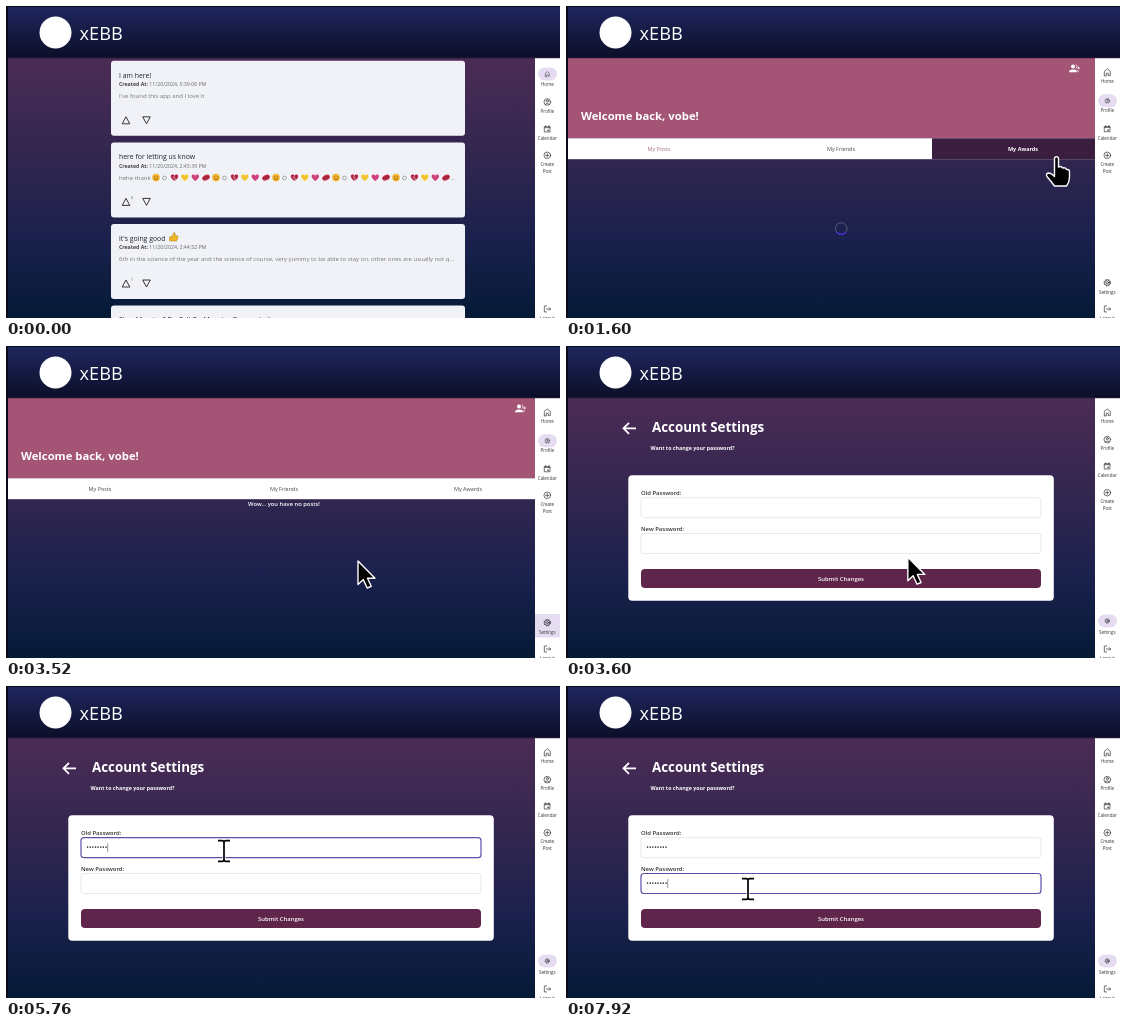
An HTML page for the animation above (8000 ms loop, 554 px wide and 312 px high).

```html
<!DOCTYPE html>
<html lang="en">
<head>
<meta charset="utf-8">
<title>Account walkthrough</title>
<style>
  html, body { margin: 0; width: 100%; height: 100%; overflow: hidden; background: #0a0d24; }
  svg { display: block; width: 100vw; height: 100vh; font-family: "Open Sans", "Noto Sans", sans-serif; }
  .line { fill: none; stroke: #2b2930; stroke-width: 2; stroke-linecap: round; stroke-linejoin: round; }
  .pointer { fill: #000; stroke: #fff; stroke-width: 1.4; stroke-linejoin: round; }
</style>
</head>
<body>
<svg id="stage" viewBox="0 0 554 312"></svg>
<script>
const stage = document.getElementById('stage');

const text = (x, y, size, fill, content, weight = 400, anchor = 'start') =>
  `<text x="${x}" y="${y}" font-size="${size}" fill="${fill}" font-weight="${weight}" text-anchor="${anchor}">${content}</text>`;
const rect = (x, y, w, h, fill, rx = 0, extra = '') =>
  `<rect x="${x}" y="${y}" width="${w}" height="${h}" fill="${fill}" rx="${rx}" ${extra}/>`;
const gradient = (id, ...stops) =>
  `<linearGradient id="${id}" x2="0" y2="1">${stops.map(([at, color]) =>
    `<stop offset="${at}" stop-color="${color}"/>`).join('')}</linearGradient>`;

// Icons are drawn on a 24-unit grid centred on the origin.
const icons = {
  Home: '<path d="M-9 10V-3L0-10 9-3V10H3V3H-3V10Z"/>',
  Profile: '<circle r="10"/><circle cy="-3" r="3.4"/><path d="M-6.5 7Q0 0 6.5 7"/>',
  Calendar: '<path d="M-8-7H8V9H-8ZM-8-4H8M-5-10V-7M5-10V-7"/><path d="M2 3H4V5H2Z"/>',
  Create: '<circle r="10"/><path d="M-5 0H5M0-5V5"/>',
  Settings: '<circle r="8"/><circle r="3.4"/><circle r="9.8" stroke-width="3" stroke-dasharray="3.8 3.9" stroke-linecap="butt"/>',
  Logout: '<path d="M-2-9H-9V9H-2M-3 0H10M6-4 10 0 6 4"/>'
};

function sidebar(active, ys, hover) {
  const item = ([name, y]) => {
    const on = name === active;
    const labelY = name === 'Settings' ? 287.5 : y + (on ? 11.5 : 10.7);
    return (on ? rect(532, y - 6.5, 19, 13, '#e6dcf2', 6.5) : '') +
      `<g class="line" transform="translate(541.3 ${y}) scale(${on ? .23 : .33})">${icons[name]}</g>` +
      text(541.3, labelY, 4.5, '#333', name, 400, 'middle') +
      (name === 'Create' ? text(541.3, labelY + 7, 4.5, '#333', 'Post', 400, 'middle') : '');
  };
  return rect(529, 52, 25, 260, '#fff') +
    (hover ? `<g class="hover">${rect(529, hover, 25, 23.5, '#e6dcf2')}</g>` : '') +
    Object.entries(ys).map(item).join('');
}

const heart = (x, y, fill) =>
  `<path transform="translate(${x} ${y})" fill="${fill}" d="M0 3.4C-2.5 1.5-3.7.2-3.7-1.3-3.7-3.3-1-3.9 0-1.8 1-3.9 3.7-3.3 3.7-1.3 3.7.2 2.5 1.5 0 3.4Z"/>`;

function emojiRow(y) {
  let row = '';
  for (let x = 150; x < 400; x += 60) {
    row += `<circle cx="${x}" cy="${y}" r="3.8" fill="#f3b52f"/>
      <path d="M${x - 2} ${y + .7}q2 2.4 4 0M${x - 2} ${y - 1}h1.2M${x + .8} ${y - 1}h1.2" fill="none" stroke="#7b4a12" stroke-width=".7"/>
      <circle cx="${x + 8.5}" cy="${y + .4}" r="1.9" fill="none" stroke="#777" stroke-width=".6"/>` +
      heart(x + 18.5, y, '#b3203f') +
      `<path d="M${x + 18.5} ${y - 2}l-1 2 2 1-1 2" fill="none" stroke="#f0f2f8" stroke-width=".6"/>` +
      heart(x + 28.8, y, '#f5c531') + heart(x + 39.3, y, '#d2407c') +
      `<ellipse cx="${x + 50}" cy="${y}" rx="4" ry="2.7" fill="#c22c45" transform="rotate(-25 ${x + 50} ${y})"/>
      <path d="M${x + 47} ${y + 1}l6-2.4" stroke="#6e1830" stroke-width=".8"/>`;
  }
  return row;
}

function card(index, title, date, body, votes = '', extra = '') {
  return `<g transform="translate(0 ${index * 81.6})">` +
    rect(105, 54.8, 354, 75, '#f0f2f8', 3) +
    text(113, 71.5, 6.9, '#22222a', title, 500) +
    text(113, 80, 5.2, '#666', `<tspan font-weight="700" fill="#444">Created At:</tspan> ${date}`) +
    text(113, 92.2, 6, '#777', body) +
    `<path d="M120 110.8 123.8 117.8H116.2ZM140.5 117.8 136.7 110.8H144.3Z" fill="none" stroke="#222" stroke-width=".9"/>` +
    text(124.8, 111.8, 4.2, '#555', votes) + extra + '</g>';
}

const thumb = `<path transform="translate(163 63.5)" fill="#f0b429" stroke="#9a6a14" stroke-width=".4"
  d="M.5 4.2 3 3.6 5-.2Q6.6-.2 6.2 2L5.8 3H8.6Q9.4 3.4 8.8 4.4 9.2 5.2 8.6 5.8 8.8 6.8 8 7.2 8 8.4 6.8 8.4H3L.5 8Z"/>`;

const home =
  card(0, 'I am here!', '11/20/2024, 5:39:06 PM', "I've found this app and I love it") +
  card(1, 'here for letting us know', '11/20/2024, 2:45:39 PM', 'hehe thank', '2',
    emojiRow(90) + text(444.5, 92.2, 6, '#777', '...')) +
  card(2, "it's going good", '11/20/2024, 2:44:52 PM',
    '6th in the science of the year and the science of course, very yummy to be able to stay on. other ones are usually not q...', '1', thumb) +
  card(3, 'Slow Morning? Do Call On Monster Games day!', '', '') +
  sidebar('Home', { Home: 68, Profile: 96, Calendar: 123, Create: 149.3, Logout: 303 }, 87);

const tabNames = ['My Posts', 'My Friends', 'My Awards'];
const profile =
  rect(2, 52, 527, 80.5, '#a45576') +
  text(15, 114, 11.3, '#fff', 'Welcome back, vobe!', 700) +
  `<g id="addFriend"><g fill="#fff"><circle cx="507" cy="60.6" r="2"/><path d="M503 66.2Q503 63.4 507 63.4 511 63.4 511 66.2Z"/>
    <path d="M509.6 58.7a2 2 0 0 1 0 3.8M511 63.8q1.3.8 1.3 2.4" fill="none" stroke="#fff" stroke-width=".8"/></g>
    <path d="M511.4 62H514M512.7 60.7V63.3" stroke="#fff" stroke-width=".8"/></g>` +
  rect(2, 132.3, 527, 20.9, '#fff') +
  tabNames.map(name => `<g class="tab">${rect(0, 132.3, 184, 20.9, '#3b1d40')}${text(0, 144.7, 5.5, '#444', name, 400, 'middle')}</g>`).join('') +
  `<g id="spinner"><circle cx="275.3" cy="222.6" r="5.8" fill="none" stroke="#6a6678" stroke-width=".8"/>
    <path id="spinArc" d="M270.5 225.9A5.8 5.8 0 0 0 280.1 225.9" fill="none" stroke="#4a2be0" stroke-width="1.4"/></g>
   <g id="noPosts">${text(278, 160, 5.8, '#fff', 'Wow... you have no posts!', 600, 'middle')}</g>` +
  sidebar('Profile', { Home: 66.3, Profile: 94.8, Calendar: 122.8, Create: 149.3, Settings: 276.7, Logout: 303 }, 268);

const field = (label, y) =>
  text(75, y - 2.5, 5.9, '#333', label, 600) +
  rect(75, y, 400, 20, '#fff', 3, 'class="box" stroke-width=".8"') +
  `<text class="dots" x="80.3" y="${y + 12.6}" font-size="7" fill="#333"></text>` +
  rect(80.5, y + 5.5, .6, 9, '#555', 0, 'class="caret"');

const settings =
  '<path d="M70 82.3H57.5M63 76.8 57.5 82.3 63 87.8" fill="none" stroke="#fff" stroke-width="1.8"/>' +
  text(86, 85.8, 13.4, '#fff', 'Account Settings', 700) +
  text(84.5, 104, 5.3, '#fff', 'Want to change your password?', 700) +
  rect(62.3, 129.3, 425.5, 125.5, '#fff', 4) +
  field('Old Password:', 151.7) + field('New Password:', 187.5) +
  rect(75, 223, 400, 19, '#5f254b', 4) +
  text(275, 234.8, 5.9, '#fff', 'Submit Changes', 600, 'middle') +
  sidebar('Settings', { Home: 66.3, Profile: 93.6, Calendar: 120, Create: 146.7, Settings: 275, Logout: 303 });

const beam = 'M-6-10.3H-2Q0-10.3 0-8.5 0-10.3 2-10.3H6M0-8.5V8.5M-6 10.3H-2Q0 10.3 0 8.5 0 10.3 2 10.3H6';
const pointers = `
  <path class="pointer" d="M0 0V23.5L5.3 18.6 9.2 27 13.2 25.3 9.5 17.2H17Z"/>
  <path class="pointer" d="M-2 2Q-2-.4 0-.4 2-.4 2 2V10Q5 8.8 6 11 9 10.2 10 12.6 13 12 13 15V20Q13 25 10 29H-2Q-5 25-9.5 19.5-11 16.5-8 16-5.5 16-2 19.5Z"/>
  <g fill="none"><path d="${beam}" stroke="#fff" stroke-width="3"/><path d="${beam}" stroke="#000" stroke-width="1.7"/></g>`;

stage.innerHTML = `<defs>
  ${gradient('page', [0, '#4c2c56'], [.4, '#30264f'], [.68, '#1b214d'], [1, '#051a37'])}
  ${gradient('bar', [0, '#20275f'], [.5, '#151a43'], [1, '#0c0f29'])}</defs>` +
  rect(0, 0, 554, 312, '#0a0a1a') + rect(2, 51, 552, 261, 'url(#page)') +
  [home, profile, settings].map(scene => `<g class="scene">${scene}</g>`).join('') +
  rect(2, 51, 552, 1.4, '#080a1c', 0, 'opacity=".5"') + rect(2, 1, 552, 50.5, 'url(#bar)') +
  '<circle cx="49.5" cy="26.5" r="16" fill="#fff"/>' + text(73.5, 33.8, 18.2, '#fff', 'xEBB') +
  `<g id="cursor">${pointers}</g>`;

const all = selector => [...stage.querySelectorAll(selector)];
const [addFriend, spinner, spinArc, noPosts, cursor] =
  ['addFriend', 'spinner', 'spinArc', 'noPosts', 'cursor'].map(id => document.getElementById(id));
const scenes = all('.scene'), hovers = all('.hover'), tabs = all('.tab');
const boxes = all('.box'), dots = all('.dots'), carets = all('.caret');
const show = (element, visible) => element.style.display = visible ? '' : 'none';

const LOOP = 8000, PROFILE_AT = 1260, LOADED_AT = 2160, SETTINGS_AT = 3600;
// time, x, y
const route = [
  [400, 440, 185], [950, 540, 98], [1080, 541, 100], [1200, 516, 130], [1600, 490.5, 151],
  [2080, 430, 205], [2400, 430, 205], [2880, 540, 273], [3260, 541, 279], [3520, 352, 215],
  [4000, 218, 165], [6120, 218, 165], [6440, 196, 222], [6720, 182, 203]
];
const typing = [{ focus: 4080, blur: 6760, start: 4600, step: 130 }, { focus: 6760, blur: LOOP, start: 6960, step: 120 }];

function cursorAt(t) {
  const next = route.findIndex(stop => stop[0] > t);
  if (next < 1) return route[next === 0 ? 0 : route.length - 1].slice(1);
  const [t0, x0, y0] = route[next - 1], [t1, x1, y1] = route[next];
  const p = (t - t0) / (t1 - t0), e = p * p * (3 - 2 * p);
  return [x0 + (x1 - x0) * e, y0 + (y1 - y0) * e];
}

function drawTabs(t, x, y) {
  const loaded = t >= LOADED_AT, width = (loaded ? 552 : 546) / 3;
  const hovered = x < 529 && y > 132.3 && y < 153.2 ? Math.floor((x - 2) / width) : -1;
  tabs.forEach((tab, i) => {
    const [back, label] = tab.children, on = i === hovered;
    back.setAttribute('x', 2 + i * width);
    back.setAttribute('width', Math.min(width, 527 - i * width));
    show(back, on);
    label.setAttribute('x', 2 + (i + .5) * width);
    label.setAttribute('fill', on ? '#fff' : i === 0 && !loaded ? '#a06a80' : '#444');
    label.setAttribute('font-weight', on ? 700 : 400);
  });
  addFriend.setAttribute('transform', `translate(${loaded ? 6 : 0})`);
  show(spinner, !loaded);
  show(noPosts, loaded);
  spinArc.setAttribute('transform', `rotate(${(t - 1600) * .36} 275.3 222.6)`);
}

function drawFields(t) {
  typing.forEach(({ focus, blur, start, step }, i) => {
    const focused = t >= focus && t < blur;
    const count = Math.max(0, Math.min(8, Math.floor((t - start) / step) + 1));
    const lastKey = count ? start + (count - 1) * step : focus;
    dots[i].textContent = '•'.repeat(count);
    carets[i].setAttribute('x', 80.5 + count * 2.63);
    show(carets[i], focused && (t - lastKey) % 1000 < 500);
    boxes[i].setAttribute('stroke', focused ? '#5a52a8' : '#e2e2e8');
    boxes[i].setAttribute('stroke-width', focused ? 1.2 : .8);
  });
}

function draw(t) {
  const scene = t < PROFILE_AT ? 0 : t < SETTINGS_AT ? 1 : 2;
  const [x, y] = cursorAt(t);
  scenes.forEach((element, i) => show(element, i === scene));
  hovers.forEach(element => show(element, t > 880 && t < PROFILE_AT || t > 2800));
  drawTabs(t, x, y);
  drawFields(t);

  const inField = scene === 2 && x > 75 && x < 475 && (y > 151 && y < 172 || y > 187 && y < 208);
  const clickable = x > 529 || scene === 1 && y > 132 && y < 153 || scene === 2 && y > 223 && y < 242;
  const shape = inField ? 2 : clickable ? 1 : 0;
  [...cursor.children].forEach((element, i) => show(element, i === shape));
  show(cursor, t >= 400);
  cursor.setAttribute('transform', `translate(${x} ${y})`);
}

const began = performance.now();
function tick() {
  draw((performance.now() - began) % LOOP);
  requestAnimationFrame(tick);
}
tick();
</script>
</body>
</html>
```
